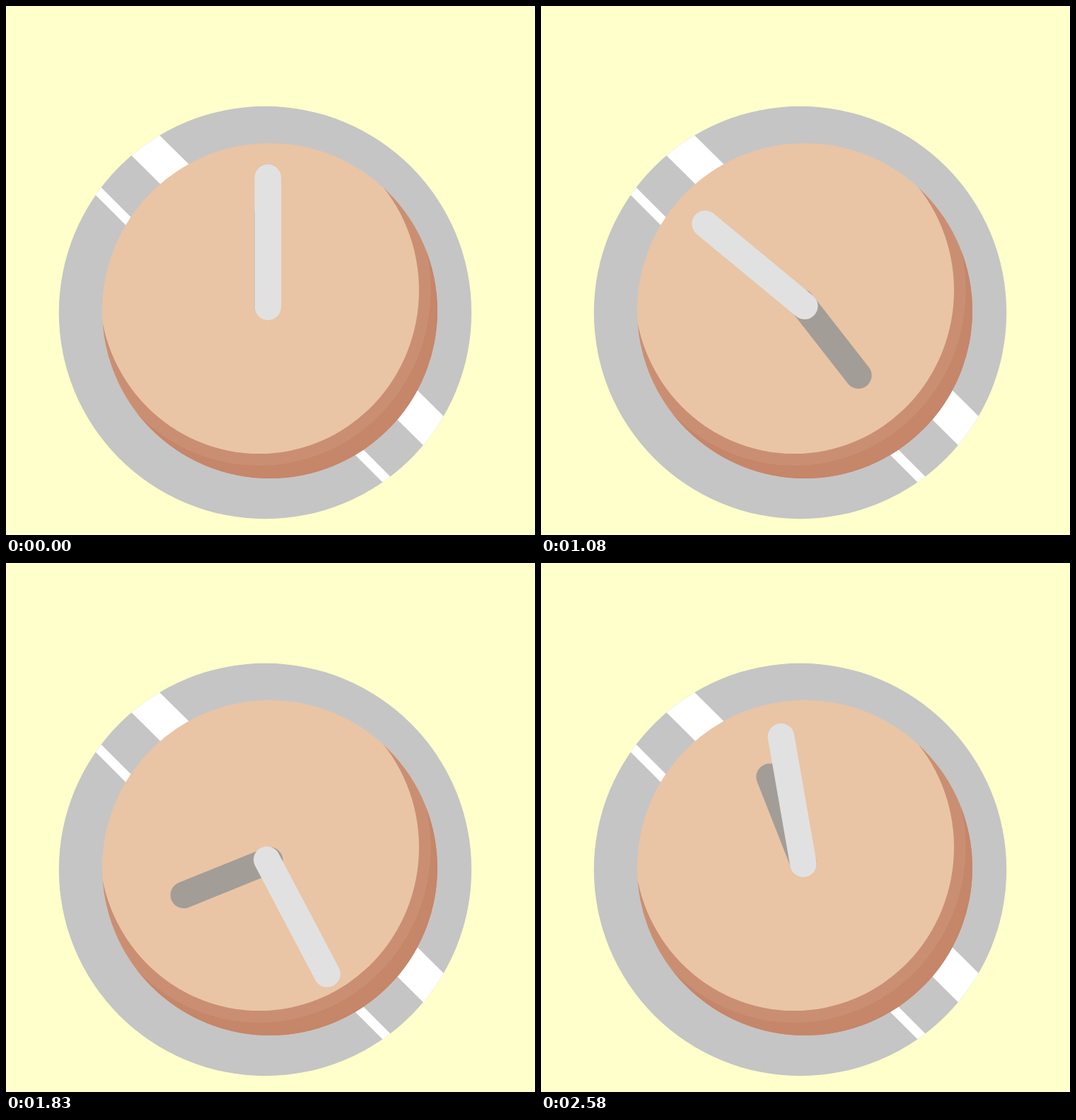
An HTML page for the animation above (2680 ms loop, 748 px wide and 748 px high).

```html
<!DOCTYPE html>
<html lang="en">
<head>
<meta charset="utf-8">
<title>Clock dial</title>
<style>
  html, body { margin: 0; width: 100%; height: 100%; overflow: hidden; background: #feffca; }
  svg { display: block; width: 100%; height: 100%; }
  line { stroke-width: 37.6; stroke-linecap: round; }
</style>
</head>
<body>
<svg viewBox="0 0 748 748">
  <defs>
    <clipPath id="ring"><circle cx="366.5" cy="433.5" r="291.7"/></clipPath>
    <clipPath id="knob"><circle cx="373" cy="431" r="237"/></clipPath>
  </defs>
  <circle cx="366.5" cy="433.5" r="291.7" fill="#c5c5c5"/>
  <g clip-path="url(#ring)" fill="#fff">
    <path d="M198 164L639 600L610 641L158 192Z"/>
    <path d="M115 237L563 685L553 694L107 247.5Z"/>
  </g>
  <circle cx="373" cy="431" r="237" fill="#e9c5a5"/>
  <!-- Side of the knob: everything outside the face, then outside the bevel -->
  <g clip-path="url(#knob)" fill-rule="evenodd">
    <path fill="#ca8f73" d="M0 0H748V748H0ZM132 402a226 231 0 1 0 452 0a226 231 0 1 0 -452 0"/>
    <path fill="#c5866a" d="M0 0H748V748H0ZM115.5 402a242.5 248 0 1 0 485 0a242.5 248 0 1 0 -485 0"/>
  </g>
  <line id="hour" stroke="#a39d97"/>
  <line id="minute" stroke="#e1e1e1"/>
</svg>
<script>
const LOOP = 2680;
const POSES = 32;
const TURN = 16; // steps in one turn of either hand

// Key angles [step, degrees], with steady speed in between
const minuteKeys = [[0, 0], [1, 23.2], [5, 128.6], [9, 222.9], [13, 309.6], [15, 350.1], [TURN, 360]];
const hourKeys = [[0, 0], [2, 43.7], [6, 142], [8, 180], [11, 248], [12, 274], [TURN, 360]];

const hour = document.getElementById('hour');
const minute = document.getElementById('minute');

function angleAt(keys, step) {
  const i = keys.findIndex(([end]) => end > step);
  const [s0, a0] = keys[i - 1], [s1, a1] = keys[i];
  return a0 + (a1 - a0) * (step - s0) / (s1 - s0);
}

// Hand around (x, y), reaching back by tail and out by length
function place(hand, x, y, degrees, tail, length) {
  const r = degrees * Math.PI / 180;
  const dx = Math.sin(r), dy = -Math.cos(r);
  hand.setAttribute('x1', x - tail * dx);
  hand.setAttribute('y1', y - tail * dy);
  hand.setAttribute('x2', x + length * dx);
  hand.setAttribute('y2', y + length * dy);
}

// Twelve poses per second, snapped to 10 ms
const startOf = n => Math.round(n * 25 / 3) * 10;

function poseAt(t) {
  let n = POSES - 1;
  while (n > 0 && startOf(n) > t) n--;
  return n;
}

// The minute hand steps on every pose, the hour hand on every second one
function draw(t) {
  const n = poseAt(t % LOOP);
  place(hour, 370, 421.5, angleAt(hourKeys, n >> 1), 3, 128);
  place(minute, 370.3, 422.3, angleAt(minuteKeys, n % TURN), 3.1, 179.4);
}

const t0 = performance.now();
function tick() {
  draw(performance.now() - t0);
  requestAnimationFrame(tick);
}
tick();
</script>
</body>
</html>
```
